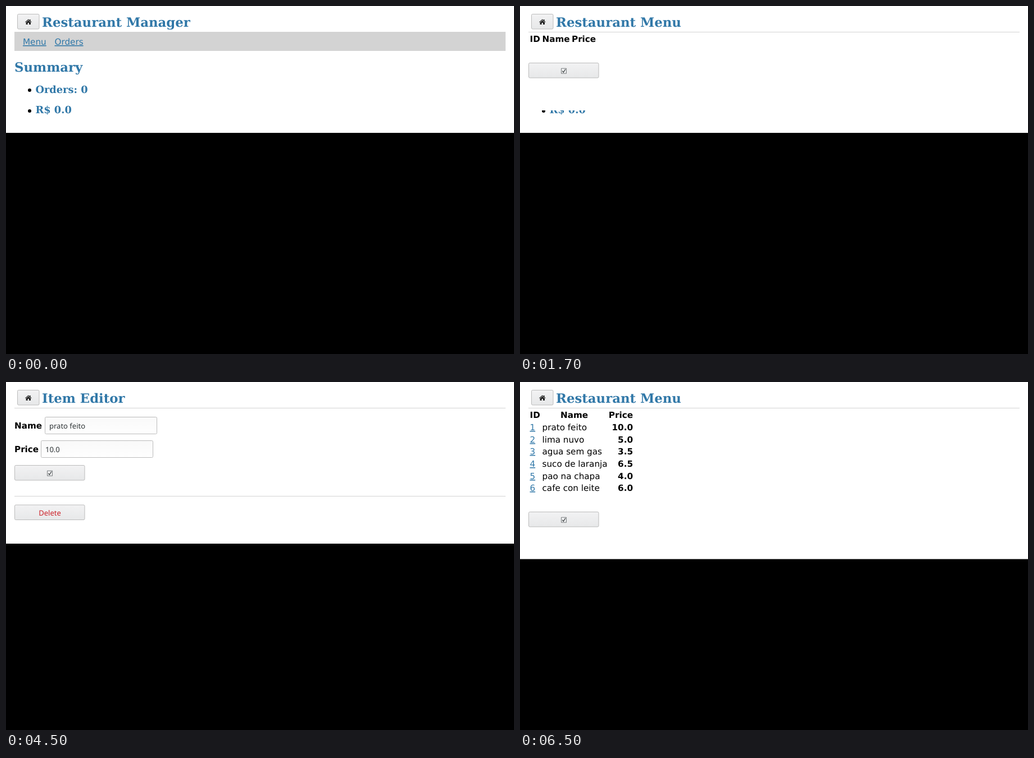
Animation, 904 px wide and 620 px high, one loop 8000 ms. Source, as an HTML page:

```html
<!DOCTYPE html>
<html lang="en">
<head>
<meta charset="utf-8">
<title>Restaurant Manager</title>
<style>
html, body { margin: 0; width: 100%; height: 100%; overflow: hidden; background: #000; }
svg { display: block; }
text { font: 15.2px "DejaVu Sans", sans-serif; white-space: pre; text-rendering: geometricPrecision; }
.h1, .h3 { font: bold 22.8px "DejaVu Serif", serif; fill: #3178a8; }
.h3 { font-size: 17.8px; }
.b { font-weight: bold; }
.r { font-weight: bold; text-anchor: end; }
.a { fill: #3178a8; text-decoration: underline; }
.in, .del { font: 13px "Noto Sans", sans-serif; fill: #2e3436; }
.del { fill: #cc2229; text-anchor: middle; }
</style>
</head>
<body>
<svg id="stage" width="904" height="620" viewBox="0 0 904 620">
  <defs>
    <linearGradient id="face" x2="0" y2="1">
      <stop stop-color="#f2f2f3"/><stop offset="1" stop-color="#e7e8e9"/>
    </linearGradient>
    <linearGradient id="field" x2="0" y2="1">
      <stop stop-color="#f9f9f9"/><stop offset="1" stop-color="#fefefe"/>
    </linearGradient>
  </defs>
  <g id="view"></g>
</svg>
<script>
const view = document.getElementById('view');

const rect = (x, y, w, h, fill) => `<rect x="${x}" y="${y}" width="${w}" height="${h}" fill="${fill}"/>`;
const text = (x, y, s, cls = '') => `<text x="${x}" y="${y}" class="${cls}">${s}</text>`;
const box = (x, y, w, h, fill) =>
  `<rect x="${x + .5}" y="${y + .5}" width="${w - 1}" height="${h - 1}" rx="2" fill="url(#${fill})" stroke="#bbb"/>`;
const rule = y => rect(15, y, 874, 1, '#d3d3d3');
const bullet = y => `<circle cx="42" cy="${y}" r="3"/>`;
const button = y => box(15, y, 125.5, 27.5, 'face');

const page = (height, title) => rect(0, 0, 904, height, '#fff') + box(20, 14, 39.5, 27.5, 'face') +
  '<path d="M34 28.4 39.8 23.5 42 25.3V24H43.6V26.7L45.6 28.4 44.9 29.2 39.8 25 34.7 29.2ZM35.6 29.2 39.8 25.8 44 29.2V33H41V30H38.6V33H35.6Z" fill="#222"/>' +
  text(64, 37, title, 'h1');

const okButton = y => button(y) +
  `<g transform="translate(73 ${y + 9.7})" fill="none" stroke="#2e3436">
    <path d="M.5 .5H9.5V9.5H.5Z" stroke-width=".6"/><path d="M2.4 5 4.2 7.6 8 1.8" stroke-width="1.2"/></g>`;

const field = (x, y, label, value) =>
  text(15, y + 21, label, 'b') + box(x, y, 200, 31, 'field') + text(x + 8, y + 21, value, 'in');

const form = price => rule(46) + field(69, 62, 'Name', 'prato feito') +
  field(62, 104, 'Price', price) + okButton(148);

const total = bullet(187) + text(52.5, 191, 'R$ 0.0', 'h3');

const summary = page(226, 'Restaurant Manager') + rect(15, 46, 874, 34, '#d3d3d3') +
  text(30, 69, 'Menu', 'a') + text(86.5, 69, 'Orders', 'a') + text(15, 117, 'Summary', 'h1') +
  bullet(150) + text(52.5, 155, 'Orders: 0', 'h3') + total;

const emptyMenu = page(226, 'Restaurant Menu') + rule(46) + text(17.5, 64, 'ID', 'b') +
  text(39.5, 64, 'Name', 'b') + text(92, 64, 'Price', 'b') + okButton(101) +
  total + rect(15, 170, 874, 16, '#fff');

const newItem = page(226, 'New Item') + form('10');

const editor = page(288, 'Item Editor') + form('10.0') + rule(203) +
  button(218.5) + text(78, 238, 'Delete', 'del');

const items = [['prato feito', '10.0'], ['lima nuvo', '5.0'], ['agua sem gas', '3.5'],
  ['suco de laranja', '6.5'], ['pao na chapa', '4.0'], ['cafe con leite', '6.0']];

const fullMenu = page(315.5, 'Restaurant Menu') + rule(46) + text(17.5, 64, 'ID', 'b') +
  text(72, 64, 'Name', 'b') + text(201, 64, 'Price', 'r') +
  items.map(([name, price], i) => {
    const y = Math.round(86 + i * 21.65);
    return text(17.5, y, i + 1, 'a') + text(39.5, y, name) + text(201, y, price, 'r');
  }).join('') + okButton(231);

const scenes = [[0, summary], [500, emptyMenu], [2500, newItem], [4500, editor], [6500, fullMenu]];
let shown;

function draw(now) {
  const t = now % 8000;
  const scene = scenes.findLast(([start]) => t >= start)[1];
  if (scene !== shown) view.innerHTML = shown = scene;
  requestAnimationFrame(draw);
}
draw(0);
</script>
</body>
</html>
```
